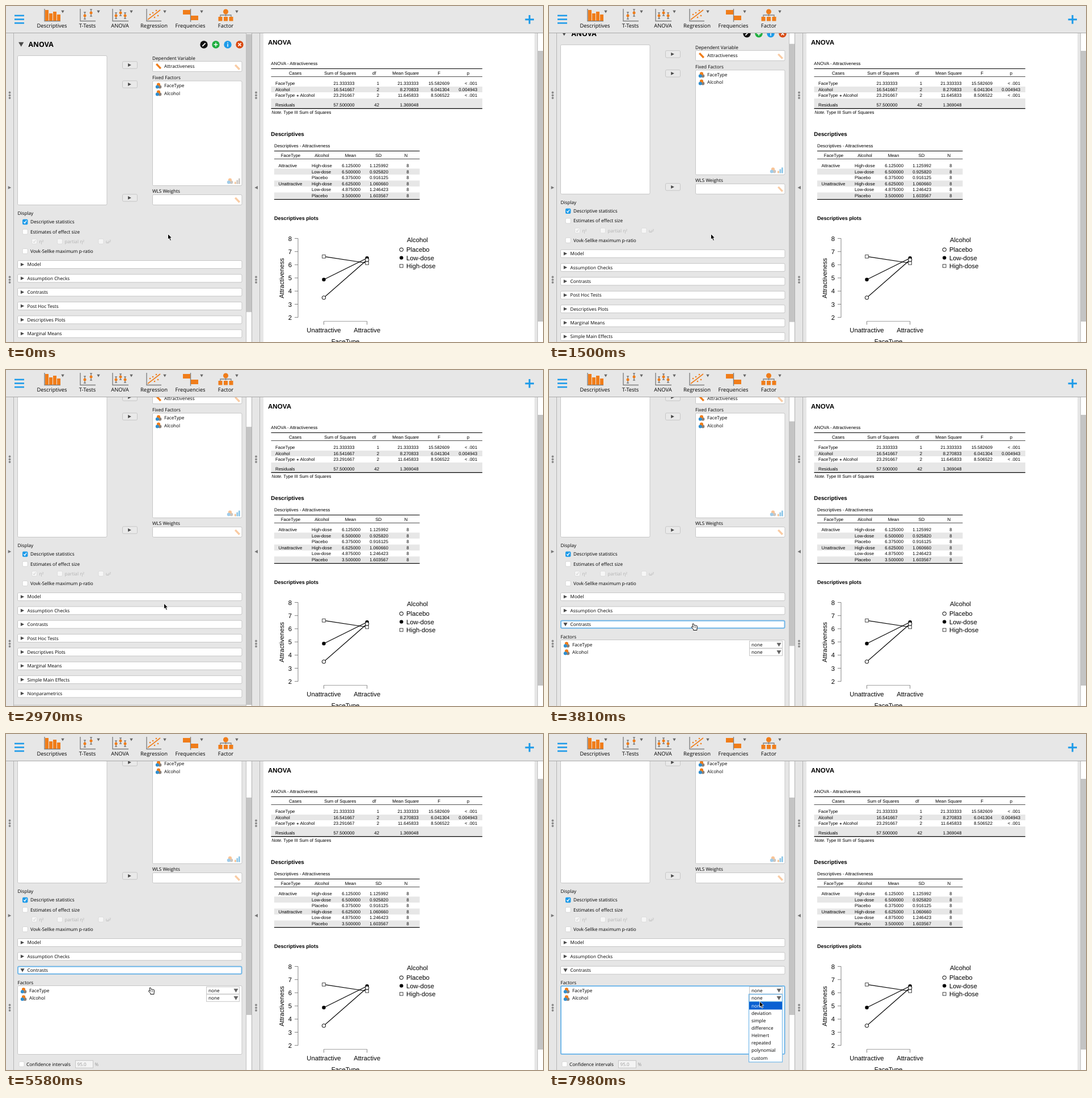
Write an HTML page that moves like this. It is 947x592 px and loops after 8 s.

```html
<!DOCTYPE html>
<html lang="en">
<head>
<meta charset="utf-8">
<title>ANOVA contrasts</title>
<style>
html, body { margin: 0; width: 100%; height: 100%; overflow: hidden; background: #e6e6e6; }
svg { display: block; }
text { text-rendering: geometricPrecision; white-space: pre; }
.ui { font-family: "Open Sans", "Noto Sans", sans-serif; font-weight: 500; }
.doc { font-family: "Liberation Sans", Arial, sans-serif; }
.bold { font-weight: 700; }
</style>
</head>
<body>
<svg id="stage" width="947" height="592" viewBox="0 0 947 592"></svg>
<script>
const ORANGE = '#f07d1a', BLUE = '#1e9be9', GREY = '#808080', INK = '#000';
const FOCUS = '#74b9ea', EDGE = '#c6c6c6', THUMB = '#c4c4c4', SMALL = 8.2, CELL = 7.85;

// ---- drawing helpers (y of a text is its visual middle) ----
const rect = (x, y, w, h, fill, more = '') =>
  `<rect x="${x}" y="${y}" width="${w}" height="${h}" fill="${fill}" ${more}/>`;
const line = (x1, y1, x2, y2, color = '#000', w = 1) =>
  `<path d="M${x1} ${y1}L${x2} ${y2}" stroke="${color}" stroke-width="${w}" fill="none"/>`;
const path = (d, fill, more = '') => `<path d="${d}" fill="${fill}" ${more}/>`;
const dot = (x, y, r, fill, more = '') => `<circle cx="${x}" cy="${y}" r="${r}" fill="${fill}" ${more}/>`;
const text = (x, y, str, size, font, more = '') =>
  `<text x="${x}" y="${y + size * .36}" font-size="${size}" class="${font}" ${more}>${str}</text>`;
const MID = 'text-anchor="middle"', END = 'text-anchor="end"';
const ui = (x, y, str, more = `fill="${INK}"`) => text(x, y, str, SMALL, 'ui', more);
const cell = (x, y, str, more = '') => text(x, y, str, CELL, 'doc', more);
const group = (id, body, more = '') => `<g id="${id}" ${more}>${body}</g>`;
const right = (x, y, r = 3.5, c = '#4a4a4a') => path(`M${x - r} ${y - r}L${x + r} ${y}L${x - r} ${y + r}Z`, c);
const down = (x, y, r = 4, c = '#4a4a4a') => path(`M${x - r} ${y - r * .8}H${x + r}L${x} ${y + r * .9}Z`, c);
const panel = (x, y, w, h, edge = EDGE) => rect(x, y, w, h, '#fff', `stroke="${edge}" rx="2"`);

// ---- toolbar ----
function errorPoint(x, y, h) {
  return line(x, y - h, x, y + h, '#555') + line(x - 2, y - h, x + 2, y - h, '#555') +
    line(x - 2, y + h, x + 2, y + h, '#555') + dot(x, y, 2.5, ORANGE);
}
const axes = (x, w) => path(`M${x} 5V26.5H${x + w}`, 'none', `stroke="${GREY}" stroke-width="1.4"`);

function toolbar() {
  let s = rect(0, 0, 947, 47, '#e7e7e7') + line(0, 47.5, 947, 47.5, '#a9a9a9');
  for (const y of [15.6, 22.2, 28.8]) s += rect(15, y, 17, 2.6, BLUE);
  s += rect(915.5, 22.3, 15.5, 3, BLUE) + rect(921.7, 16, 3, 15.5, BLUE);

  s += axes(68, 28);
  [[69, 19], [76, 13], [83, 16], [90, 11]].forEach(([x, h]) => s += rect(x, 26 - h, 6, h, ORANGE));
  s += axes(131, 27) + errorPoint(139, 17, 6) + errorPoint(150, 12, 6);
  s += axes(188, 28) + errorPoint(194, 17, 5) + errorPoint(202, 12, 5) + errorPoint(210, 17, 5);
  s += axes(248, 26) + line(250, 24, 272, 7, ORANGE, 1.6);
  for (const [x, y] of [[254, 15], [259, 12], [262, 20], [268, 17], [265, 8]]) s += dot(x, y, 1.3, ORANGE);
  s += line(325.5, 5, 325.5, 28, GREY, 1.4) + rect(312, 7, 13, 8, ORANGE) + rect(326, 17, 13, 8, ORANGE);
  s += path('M387.5 12V18M378 20V16H397V20', 'none', `stroke="${GREY}" stroke-width="1.3"`);
  s += dot(387.5, 10, 4.5, ORANGE);
  for (const x of [374.5, 384, 393.5]) s += rect(x, 19, 7, 7.5, ORANGE);

  [['Descriptives', 81, 100], ['T-Tests', 143.5, 163], ['ANOVA', 201, 221], ['Regression', 261, 280],
   ['Frequencies', 325, 345], ['Factor', 387.5, 407]].forEach(([name, x, arrow]) =>
    s += text(x, 35, name, 9.4, 'ui', MID) + down(arrow, 10, 2.7, '#666'));
  return s;
}

// ---- form icons ----
const ruler = (x, y, alpha = 1) =>
  path(`M${x - 5} ${y - 3}L${x - 2.5} ${y - 5.2}L${x + 5} ${y + 2.6}L${x + 2.6} ${y + 5}Z`, ORANGE, `opacity="${alpha}"`);
const nominal = (x, y, alpha = 1) => `<g opacity="${alpha}">` +
  dot(x + 2.3, y + 1.9, 3, '#8b8078') + dot(x, y - 2, 3.1, ORANGE) + dot(x - 2.2, y + 1.9, 3, '#2f8fd0') + '</g>';
const bars = (x, y, a, b) => rect(x - 5, y + 1, 2.7, 4, a) + rect(x - 1.5, y - 2, 2.7, 7, b) + rect(x + 2, y - 5, 2.7, 10, b);

const checkbox = (x, y, on = false) => on
  ? rect(x - 4.7, y - 4.7, 9.4, 9.4, BLUE, 'rx="2"') +
    path(`M${x - 2.4} ${y}L${x - .6} ${y + 2.2}L${x + 2.5} ${y - 2.6}`, 'none', 'stroke="#fff" stroke-width="1.3"')
  : rect(x - 4.5, y - 4.5, 9, 9, '#fff', 'stroke="#d0d0d0" stroke-width=".8" rx="2"');
const assign = y => rect(205.5, y - 6.2, 26, 12.4, '#e9e9e9', `stroke="${EDGE}" rx="2"`) + right(218, y, 2.9);
const header = (name, y) => panel(20.5, y - 7, 395.5, 14) + right(29, y, 3.1) + ui(37.5, y, name);
const combo = y => rect(353.5, y - 6.5, 58, 12.5, '#fff', `stroke="${EDGE}"`) + ui(357, y, 'none') + down(405.5, y, 4, '#666');

function formTop() {
  let s = down(26.7, 67.5, 4.6) + text(39.5, 68, 'ANOVA', 12.3, 'ui bold');
  s += dot(349, 68, 6.7, '#111') + line(346.3, 70.8, 351.6, 65.5, '#fff', 1.8);
  s += dot(370, 68, 6.7, '#1fae3f') + line(366.5, 68, 373.5, 68, '#fff', 1.5) + line(370, 64.5, 370, 71.5, '#fff', 1.5);
  s += dot(391, 68, 6.7, BLUE) + rect(390.3, 66.8, 1.5, 5, '#fff') + dot(391, 64.8, .9, '#fff');
  s += dot(412, 68, 6.7, '#d9480f') + line(409.4, 65.4, 414.6, 70.6, '#fff', 1.6) + line(414.6, 65.4, 409.4, 70.6, '#fff', 1.6);

  s += panel(20.5, 87.5, 157.5, 263) + assign(104) + assign(138) + assign(338);
  s += ui(258, 92.3, 'Dependent Variable') + panel(258.5, 97.5, 157.5, 18) +
    ruler(269, 106.3) + ui(279, 106, 'Attractiveness') + ruler(408, 108, .4);
  s += ui(258, 126.5, 'Fixed Factors') + panel(258.5, 132, 157.5, 184.5);
  [['FaceType', 140.5], ['Alcohol', 153.7]].forEach(([name, y]) => s += nominal(269, y) + ui(279, y, name));
  s += nominal(395, 308.7, .45) + group('barsPale', bars(408, 308.7, '#f4c9a2', '#cbc5c0')) +
    group('barsBlue', bars(408, 308.7, '#f6c294', '#8cc6e8'));
  s += ui(258, 326.3, 'WLS Weights') + panel(258.5, 332.5, 157.5, 18) + ruler(408, 342, .4);

  const faint = 'fill="#b2b2b2"';
  s += ui(20.5, 365.5, 'Display');
  s += checkbox(33.7, 380.5, true) + ui(43, 380.5, 'Descriptive statistics');
  s += checkbox(33.7, 397.7) + ui(43, 397.7, 'Estimates of effect size');
  [[50, 'η²'], [95, 'partial η²'], [167.5, 'ω²']].forEach(([x, name], i) => {
    s += `<g opacity=".65">${checkbox(x, 414.8)}</g>` + ui(x + 8.5, 414.8, name, faint);
    if (!i) s += path('M47.8 415L49.5 417L52.3 412.5', 'none', 'stroke="#ccc"');
  });
  return s + checkbox(33.7, 432) + ui(43, 432, 'Vovk-Sellke maximum p-ratio');
}

function contrasts() {
  let s = ui(20.5, 526, 'Factors') + panel(20.5, 531.5, 395.5, 121);
  s += rect(21, 532, 394.5, 120, 'none', `id="boxFocus" stroke="${FOCUS}" stroke-width="2" rx="2"`);
  [['FaceType', 540], ['Alcohol', 553.3]].forEach(([name, y]) => s += nominal(31, y) + ui(41, y, name) + combo(y));
  s += checkbox(27.5, 669.7) + ui(36, 669.7, 'Confidence intervals');
  return s + rect(122.5, 663.3, 31, 13, '#f4f4f4', `stroke="${EDGE}"`) +
    ui(125.5, 669.7, '95.0', 'fill="#999"') + ui(156.5, 669.7, '%', 'fill="#999"');
}

const headY = i => 455.5 + i * 24.35;
function form() {
  const early = ['Model', 'Assumption Checks'], late = ['Post Hoc Tests', 'Descriptives Plots',
    'Marginal Means', 'Simple Main Effects', 'Nonparametrics'];
  const y = headY(2);
  return formTop() + early.map((n, i) => header(n, headY(i))).join('') +
    panel(20.5, y - 7, 395.5, 14) + group('shut', right(29, y, 3.1)) + group('open', down(29, y, 3.6)) +
    ui(37.5, y, 'Contrasts') + rect(21, y - 6.5, 394.5, 13, 'none', `id="headFocus" stroke="${FOCUS}" stroke-width="2" rx="2"`) +
    group('detail', contrasts(), 'clip-path="url(#fold)"') +
    group('late', late.map((n, i) => header(n, headY(i + 3))).join('') + line(14, 646.5, 423, 646.5, '#bdbdbd'));
}

// ---- results ----
function results() {
  let s = rect(454, 48, 478, 544, '#fff');
  s += text(462, 64.3, 'ANOVA', 11.6, 'doc bold') + cell(467.3, 101.3, 'ANOVA - Attractiveness');
  s += rect(467.5, 142, 372.5, 10, '#e7e7e7') + rect(467.5, 163, 372.5, 17, '#e7e7e7');
  s += line(467.5, 110.5, 840, 110.5, '#000', 1.2) + line(467.5, 124.5, 840, 124.5, '#222', .8) + line(467.5, 180.7, 840, 180.7, '#000', 1.3);
  [['Cases', 510], ['Sum of Squares', 589.3], ['df', 649.3], ['Mean Square', 704.7], ['F', 763.7], ['p', 815]]
    .forEach(([n, x]) => s += cell(x, 118, n, MID));
  const ends = [614.5, 658, 727.5, 782, 831];
  [[136, 'FaceType', '21.333333', '1', '21.333333', '15.582609', '&lt; .001'],
   [146.8, 'Alcohol', '16.541667', '2', '8.270833', '6.041304', '0.004943'],
   [157.3, 'FaceType <tspan font-size="6.2">∗</tspan> Alcohol', '23.291667', '2', '11.645833', '8.506522', '&lt; .001'],
   [173.8, 'Residuals', '57.500000', '42', '1.369048']].forEach(([y, name, ...vals]) => {
    s += cell(475, y, name);
    vals.forEach((v, i) => s += cell(ends[i], y, v, END));
  });
  s += cell(468.5, 187, '<tspan font-style="italic">Note.</tspan> Type III Sum of Squares');

  s += text(467.3, 225, 'Descriptives', 9.85, 'doc bold') + cell(473, 246, 'Descriptives - Attractiveness');
  for (const y of [286.5, 307.5, 328.5]) s += rect(473, y, 256.5, 10.5, '#e7e7e7');
  s += line(473, 255.5, 729.5, 255.5, '#000', 1.2) + line(473, 269.5, 729.5, 269.5, '#222', .8) + line(473, 340.7, 729.5, 340.7, '#000', 1.3);
  [['FaceType', 502], ['Alcohol', 557], ['Mean', 607.5], ['SD', 657], ['N', 705.3]].forEach(([n, x]) => s += cell(x, 262.7, n, MID));
  const doses = ['High-dose', 'Low-dose', 'Placebo'];
  ['6.125000 1.125992', '6.500000 0.925820', '6.375000 0.916125', '6.625000 1.060660', '4.875000 1.246423', '3.500000 1.603567']
    .forEach((pair, i) => {
      const y = 281.2 + i * 10.5, [mean, sd] = pair.split(' ');
      if (i % 3 == 0) s += cell(480.5, y, i ? 'Unattractive' : 'Attractive');
      s += cell(539, y, doses[i % 3]) + cell(625, y, mean, END) + cell(674, y, sd, END) + cell(708.5, y, '8', MID);
    });
  return s + chart();
}

function chart() {
  const size = 11.3, py = v => 409.5 + (8 - v) * 23.2, xs = [560.5, 636.7];
  const label = (x, y, str, more) => text(x, y, str, size, 'doc', more);
  const ring = 'stroke="#000" stroke-width="1"';
  const marks = {
    open: (x, y) => dot(x, y, 3.2, '#fff', ring),
    full: (x, y) => dot(x, y, 3.2, '#000'),
    box: (x, y) => rect(x - 2.8, y - 2.8, 5.6, 5.6, '#fff', 'stroke="#333" stroke-width=".9"')
  };
  const series = [['full', 4.875, 6.5], ['box', 6.625, 6.125], ['open', 3.5, 6.375]];
  let s = text(473, 373.5, 'Descriptives plots', 9.05, 'doc bold');
  s += line(515, py(8), 515, py(2), '#777', .9);
  for (let v = 2; v <= 8; v++) s += line(509, py(v), 515, py(v), '#777', .9) + label(504, py(v), v, END);
  s += line(xs[0], 555.5, xs[1], 555.5, '#999', .9);
  xs.forEach((x, i) => s += line(x, 555.5, x, 561.5, '#777', .9) + label(x, 570.7, ['Unattractive', 'Attractive'][i], MID));
  s += label(598.5, 590.5, 'FaceType', MID);
  s += `<g transform="translate(486 479.5) rotate(-90)">${label(0, 0, 'Attractiveness', MID)}</g>`;
  for (const [, a, b] of series) s += line(xs[0], py(a), xs[1], py(b), '#000', 1.2);
  for (const [kind, a, b] of series) s += marks[kind](xs[0], py(a)) + marks[kind](xs[1], py(b));
  s += label(707, 411.7, 'Alcohol');
  [['open', 'Placebo', 429.3], ['full', 'Low-dose', 443.6], ['box', 'High-dose', 458]]
    .forEach(([kind, name, y]) => s += marks[kind](697.3, y) + label(706, y, name));
  return s;
}

// ---- frame around the panels ----
function splitters() {
  let s = '';
  for (const x of [6.5, 441]) for (const y of [152.5, 157.3, 162, 477.5, 482.3, 487]) s += dot(x, y, 1.9, '#8a8a8a');
  s += right(6.5, 320, 2.8, '#777') + path('M444 317L438.4 320L444 323Z', '#777');
  s += line(13.5, 48, 13.5, 592, '#b5b5b5') + line(433.5, 48, 433.5, 592, '#b0b0b0') + line(447.5, 48, 447.5, 592, '#b5b5b5');
  s += rect(423, 48, 10, 544, '#fff') + rect(423, 49, 10, 490, THUMB, 'id="thumb"') + line(423.5, 48, 423.5, 592, '#c0c0c0');
  return s + rect(937, 48, 10, 544, '#fff') + rect(937, 79, 10, 477, THUMB) + line(937.5, 48, 937.5, 592, '#c0c0c0');
}

function popup() {
  let s = rect(352.5, 458.5, 59, 13, 'none', `stroke="${FOCUS}" stroke-width="1.4"`) +
    rect(352.5, 471.5, 59, 106.5, '#fff', `stroke="${FOCUS}" stroke-width="1.2"`) + rect(353, 472, 58, 13.5, '#0a60d2');
  ['none', 'deviation', 'simple', 'difference', 'Helmert', 'repeated', 'polynomial', 'custom']
    .forEach((n, i) => s += ui(357, 478.6 + i * 13.15, n, `fill="${i ? INK : '#fff'}"`));
  return s;
}

const arrowCursor = path('M0 0V10L2.3 8L4 12L5.9 11.2L4.2 7.3H7.2Z', '#000', 'stroke="#fff" stroke-width=".9"');
const handCursor = path('M-1.5 1C-1.5 -.4 .4 -.6 .9 .8L1.8 3.2L5 3.1Q7 3.4 7.1 5.5L6.4 9V11.5H.2V9.8L-3.2 6.4Q-3.6 4.9 -2 5.1L-.2 6.2Z', '#fff', 'stroke="#111" stroke-width="1"') +
  path('M2.5 5V7M4.5 5V7', 'none', 'stroke="#111" stroke-width=".7"');

document.getElementById('stage').innerHTML =
  `<defs><clipPath id="view"><rect x="14" y="48" width="409" height="544"/></clipPath>
   <clipPath id="fold"><rect id="foldBox" x="14" y="513" width="409" height="0"/></clipPath></defs>` +
  rect(0, 0, 947, 592, '#e6e6e6') + `<g clip-path="url(#view)">${group('form', form())}</g>` +
  results() + splitters() + toolbar() + group('popup', popup()) + group('arrow', arrowCursor) + group('hand', handCursor);

// ---- motion ----
const SCROLL = [[1110, 0], [1300, 4], [1500, 19], [1620, 39.5], [1730, 52], [1800, 56],
  [4140, 56], [4440, 72], [4770, 72], [4920, 88]];
const FOLD = [[3480, 0], [3580, .25], [3780, .85], [3930, 1]];
const MOUSE_X = [[2670, 285.5], [2970, 278.5], [3450, 254.5], [5580, 254.5], [5900, 290], [6200, 345], [6360, 357.5], [7200, 357.5], [7700, 371.5]];
const MOUSE_Y = [[2670, 401.5], [2970, 411], [3450, 447], [5580, 447], [6360, 469], [7200, 469], [7700, 471]];
const OPEN_AT = 6600, HAND_AT = 3060, CLICK_AT = 3480, LOOP = 8000;

function at(keys, t) {
  const i = keys.findIndex(k => k[0] > t);
  if (i < 0) return keys[keys.length - 1][1];
  if (i == 0) return keys[0][1];
  const [t0, a] = keys[i - 1], [t1, b] = keys[i];
  return a + (b - a) * (t - t0) / (t1 - t0);
}
const el = id => document.getElementById(id);
const show = (id, on) => el(id).setAttribute('visibility', on ? 'visible' : 'hidden');
const move = (id, x, y) => el(id).setAttribute('transform', `translate(${x} ${y})`);

function draw(t) {
  const scroll = at(SCROLL, t), fold = at(FOLD, t), clicked = t >= CLICK_AT, opened = t >= OPEN_AT;
  move('form', 0, -scroll);
  move('late', 0, fold * 165);
  el('foldBox').setAttribute('height', fold * 165);
  el('thumb').setAttribute('y', 49.3 + scroll * (.907 - .195 * fold));
  el('thumb').setAttribute('height', 490 - 107 * fold);
  show('barsPale', t < 180);
  show('barsBlue', t >= 180);
  show('shut', !clicked);
  show('open', clicked);
  show('headFocus', clicked && !opened);
  show('boxFocus', opened);
  show('popup', opened);
  const hand = t >= HAND_AT && !opened;
  show('hand', hand);
  show('arrow', !hand);
  move(hand ? 'hand' : 'arrow', at(MOUSE_X, t), at(MOUSE_Y, t));
}

const start = performance.now();
function tick() {
  draw((performance.now() - start) % LOOP);
  requestAnimationFrame(tick);
}
tick();
</script>
</body>
</html>
```
